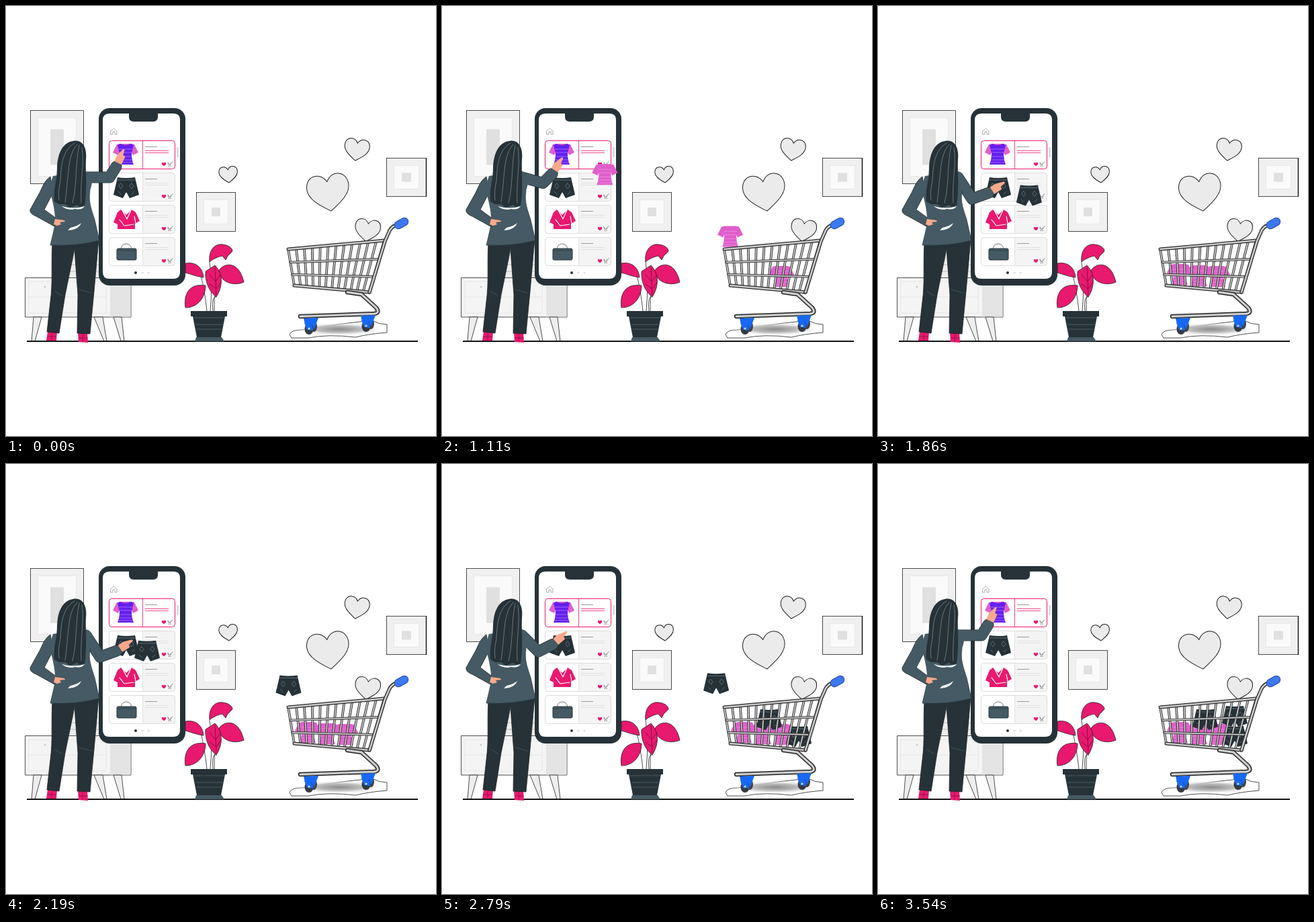
These frames come from a looping animation (640 by 640 pixels, 4.53 s). An HTML page:

```html
<!DOCTYPE html>
<html lang="en">
<head>
<meta charset="utf-8">
<title>Shopping</title>
<style>
html, body { margin: 0; width: 100%; height: 100%; overflow: hidden; background: #fff; }
svg { display: block; width: 640px; height: 640px; }
.navy { fill: #263238; }
.slate { fill: #455a64; }
.pink { fill: #e8196f; }
.skin { fill: #f7a98b; }
.edge { stroke: #222; stroke-width: .8; }
.line { fill: none; stroke-linecap: round; stroke-linejoin: round; }
</style>
</head>
<body>
<svg viewBox="0 0 640 640">
  <defs>
    <radialGradient id="shade">
      <stop offset="0" stop-color="#8c8c8c"/><stop offset=".5" stop-color="#bdbdbd"/><stop offset="1" stop-color="#fff" stop-opacity="0"/>
    </radialGradient>
    <path id="heart" d="M0 28C-11 20-32 8-32-9C-32-30-9-34 0-17C9-34 32-30 32-9C32 8 11 20 0 28Z"/>
    <path id="sleeves" d="M-8-16L-13-15L-19-3L-11 1L-9-3L9-3L11 1L19-3L13-15L8-16Z"/>
    <path id="torso" d="M-8-16Q0-12 8-16L12-14L9-2Q9 8 12 15H-12Q-9 8-9-2L-12-14Z"/>
    <path id="stripes" d="M-10-8H10M-9-3H9M-9 3H9M-10 8H10M-11 12H11" fill="none" stroke-width=".8"/>
    <g id="tee">
      <use href="#sleeves" fill="#e05fca"/><use href="#torso" fill="#e05fca"/><use href="#stripes" stroke="#f08be0"/>
    </g>
    <g id="shorts">
      <path class="navy" d="M-13-15Q0-13 13-15L19 11L5 16L0 7L-5 16L-19 11Z"/>
      <path class="line" stroke="#81909a" stroke-width=".6" d="M-13-11H13M-8-6L-5-2L-8 2L-11-2ZM8-6L11-2L8 2L5-2ZM-12 6L-8 10M12 6L8 10"/>
    </g>
    <g id="icons">
      <use href="#heart" class="pink" transform="translate(235 35.500) scale(.1)"/>
      <path class="line" stroke="#444" stroke-width=".7" d="M241 33L242 36H245L246 33.500M247 32.500L248 32"/>
      <circle cx="242.500" cy="38" r=".6"/><circle cx="245" cy="38" r=".6"/>
    </g>
  </defs>

  <g id="decor"></g>

  <!-- cabinet -->
  <path fill="#ededed" d="M68 374H138V404H68Z"/>
  <path fill="none" stroke="#bbb" d="M70 385H138M70 395H138"/>
  <g class="edge">
    <path fill="#f4f4f4" d="M28.500 404.500H186V463H28.500Z"/>
    <path fill="#e4e4e4" stroke="none" d="M155 405H185.500V462.500H155Z"/>
    <path fill="#eee" d="M41 463H53L43 499H38ZM131 463H144L150 499H146ZM160 463H172L176 499H171Z"/>
  </g>
  <path fill="none" stroke="#e6e6e6" d="M34 410H149V457H34ZM34 433H149"/>
  <circle cx="58" cy="418" r="1.500" fill="#ccc"/>

  <path d="M31 499H613" stroke="#111" stroke-width="2"/>

  <!-- plant -->
  <g class="edge">
    <path class="line" d="M304 454Q308 412 303 381M308 454Q306 430 313 433M299 454Q296 425 290 400M310 454Q309 420 318 395"/>
    <g class="pink">
      <path d="M303 381C301 362 312 353 323 355C331 356 337 360 337 365L330 372L327 378L322 372C316 373 307 377 303 381Z"/>
      <path d="M316 395C322 383 346 376 354 411C340 417 321 413 316 395Z"/>
      <path d="M267 383C283 380 293 390 294 404C284 403 275 399 267 397Z"/>
      <path d="M297 416C297 432 287 449 267 449C264 430 272 412 297 416Z"/>
      <path d="M297 395L311 386C321 396 325 414 313 433C302 425 296 410 297 395Z"/>
      <path class="line" stroke="#7c0b3b" d="M311 389L313 430M303 400L312 410L319 401M303 414L313 421L320 411"/>
    </g>
  </g>
  <path class="navy" d="M275 454H329V462H275ZM278 462H326L320 493H284Z"/>
  <path class="slate" d="M283 493H321L325 499H281Z"/>
  <path d="M279 464H325M282 474H323M283 481H321" stroke="#53666f" stroke-width=".8"/>

  <!-- phone -->
  <rect class="navy" x="138" y="152" width="129" height="264" rx="16"/>
  <path fill="#fff" d="M154 160H183V165Q183 172 190 172H219Q226 172 226 165V160H249Q259 160 259 170V396Q259 406 249 406H154Q144 406 144 396V170Q144 160 154 160Z"/>
  <path class="line" stroke="#999" stroke-width=".8" d="M156 186L160.500 182L165 186V191H162V187H159V191H156Z"/>
  <rect x="254" y="210" width="3" height="15" rx="1" fill="#ddd"/>
  <g id="cards"></g>
  <g transform="translate(178 221)">
    <use href="#sleeves" fill="#e05fca"/><use href="#torso" fill="#651fef"/><use href="#stripes" stroke="#a77af7"/>
  </g>
  <use href="#shorts" x="179" y="270"/>
  <path class="pink" d="M171 303L179 311L187 303L193 307L199 320L192 324V332H166V325L160 322L166 307Z"/>
  <path class="line" stroke="#fff" stroke-width="1.200" d="M173 304L180 317L186 304M169 318L176 327L190 325M191 313L193 323"/>
  <path class="line" stroke="#777" d="M171 362Q172 354 179 354Q186 354 187 362"/>
  <rect class="slate" x="165" y="361" width="29" height="17" rx="2" stroke="#263238"/>
  <path d="M166 364H193" stroke="#263238" stroke-width=".7"/>
  <circle cx="193" cy="397" r="2" class="navy"/>
  <circle cx="203" cy="397" r="1.600" fill="#ddd"/><circle cx="212" cy="397" r="1.600" fill="#ddd"/>

  <g id="items"></g>

  <!-- woman -->
  <path class="pink" d="M62 485H76L75 498H60ZM107 486H121L122 501L108 500Z"/>
  <path d="M61 492H75M108 494H122M68 487V497M114 488V500" stroke="#8c0d43" stroke-width=".8"/>
  <path class="navy edge" d="M69 352C67 385 70 412 66 440L61 485L79 487L88 430L102 362L107 430L106 487L125 488L131 425L138 347Z"/>
  <path class="line" stroke="#53666f" stroke-width=".6" d="M102 362L99 378M73 425L83 431M109 422L127 427"/>
  <g id="arm">
    <polyline class="line" stroke="#263238" stroke-width="17"/>
    <polyline class="line" stroke="#455a64" stroke-width="15.600"/>
    <path class="skin" d="M1-6L10-6L22-2Q25 0 22 1L15 2L14 6L1 6Z"/>
  </g>
  <g class="slate">
    <path class="edge" d="M66 254C57 260 54 270 50 278L36 303C35 308 40 311 45 313L72 328L76 317L57 303L70 278Z"/>
    <path d="M70 253L118 246C130 248 130 261 125 275C122 292 128 305 132 318L139 349Q105 358 66 356L73 326C74 308 70 291 64 272Z"/>
  </g>
  <path class="line" stroke="#263238" stroke-width=".7" d="M125 275C122 292 128 305 132 318L139 349Q105 358 66 356L73 326"/>
  <path class="skin" d="M73 317L87 319L88 321L80 322L82 325L76 327L71 325Z"/>
  <path class="navy" d="M100 201C113 198 121 210 119 228C118 248 121 270 117 297L110 299L106 296L95 300L88 295L79 295L72 291C70 272 76 262 76 240C77 218 85 203 100 201Z"/>
  <path class="line" stroke="#84939a" stroke-width=".7" d="M102 204C84 214 82 238 81 260Q77 278 79 289M106 206C91 222 94 250 88 292M109 207C103 235 106 265 99 293M113 210C117 237 110 260 112 293"/>
  <path fill="#fff" d="M83 298Q101 303 117 298Q113 304 103 302Q92 305 83 298ZM92 334Q108 333 112 323Q106 328 96 330Z"/>

  <!-- cart -->
  <path class="edge" fill="#fff" d="M422 489Q424 482 440 482Q470 477 500 473L545 468Q555 474 567 474V486Q540 488 520 493Q480 488 450 494H425Z"/>
  <ellipse cx="496" cy="481" rx="68" ry="10" fill="url(#shade)"/>
  <g id="cart"></g>
  <g id="wheels"></g>
  <path d="M584 326L593 321" stroke="#1c3c87" stroke-width="12.500" stroke-linecap="round"/>
  <path d="M584 326L593 321" stroke="#3c78f0" stroke-width="11" stroke-linecap="round"/>
</svg>
<script>
const LOOP = 4530, STEP = 30;
const el = id => document.getElementById(id);
const mix = (a, b, p) => a + (b - a) * p;
const clamp = p => Math.min(1, Math.max(0, p));
const add = (id, markup) => el(id).insertAdjacentHTML('beforeend', markup);
const box = (x, y, w, h, fill, extra = '') =>
  `<rect x="${x}" y="${y}" width="${w}" height="${h}" fill="${fill}" ${extra}/>`;

// wall pictures: x, y, width, height, mat inset, centre width, centre height
for (const [x, y, w, h, m, cw, ch] of [
  [36.5, 155.5, 79, 109, 11, 20, 53], [283.5, 277.5, 58, 58, 11, 13, 13], [566.5, 226.5, 59, 57, 11, 14, 13]
]) {
  add('decor', box(x, y, w, h, '#f0f0f0', 'class="edge"') +
    box(x + m, y + m, w - 2 * m, h - 2 * m, '#fafafa', 'stroke="#e8e8e8"') +
    box(x + (w - cw) / 2, y + (h - ch) / 2, cw, ch, '#e0e0e0'));
}
add('decor', '<path d="M625.5 226V284" stroke="#222" stroke-width="1.6"/>');

for (const [x, y, scale, angle] of [[331, 251, .43, -5], [522, 214, .58, 8], [480, 278, .98, -8], [538, 334, .59, 8]]) {
  add('decor', `<use href="#heart" fill="#ebebeb" stroke="#222" stroke-width="${1 / scale}"
    transform="translate(${x} ${y}) rotate(${angle}) scale(${scale})"/>`);
}

for (let i = 0; i < 4; i++) {
  const accent = i ? '#dcdcdc' : '#e8196f';
  add('cards', `<g transform="translate(0 ${200 + 48 * i})">
    ${box(203, .5, 49, 42, i ? '#f4f4f4' : '#fff', 'rx="3"')}
    ${box(153.5, .5, 98, 42, 'none', `rx="4" stroke="${accent}"`)}
    <path d="M203.500 1V42" stroke="${accent}" stroke-width=".8"/>
    <path d="M207 9.500H225" stroke="#999"/>
    <path d="M207 15.500H242M207 18.500H242" stroke="${accent}" stroke-width=".8"/>
    <use href="#icons"/></g>`);
}

// chrome tubes: dark outline, grey body, pale highlight
const tube = (d, width) => [['#222', width], ['#8c8c8c', width * .6], ['#dedede', width * .28]]
  .map(([color, w]) => `<path class="line" d="${d}" stroke="${color}" stroke-width="${w}"/>`).join('');
const onRim = p => [mix(420, 563, p), mix(362, 349, p)];
const onBase = p => [mix(429, 541, p), mix(416, 426, p)];
const rail = p => {
  const [a, b, c, d] = [onRim(0), onBase(0), onRim(1), onBase(1)];
  return `M${mix(a[0], b[0], p)} ${mix(a[1], b[1], p)}L${mix(c[0], d[0], p)} ${mix(c[1], d[1], p)}`;
};
for (let i = 0; i <= 12; i++) add('cart', tube(`M${onRim(i / 12)}L${onBase(i / 12)}`, 3.6));
for (const p of [.36, .7]) add('cart', tube(rail(p), 3.6));
for (const p of [0, 1]) add('cart', tube(rail(p), 5));
add('cart', tube('M541 426L564 350L571 334Q575 327 584 325', 5.4) +
  tube('M508 426L529 429L551 449Q557 457 548 458L438 462', 6.4));

for (const [x, y] of [[452, 479], [537, 475]]) {
  add('wheels', `<ellipse cx="${x + 6}" cy="${y - 2}" rx="5" ry="8" fill="#444"/>
    <path fill="#1769f5" d="M${x - 9} ${y - 14}L${x + 13} ${y - 15}L${x + 7} ${y + 1}L${x - 5} ${y + 3}Z"/>
    <ellipse cx="${x - 1}" cy="${y + 2}" rx="6.5" ry="8" fill="#343a42"/>
    <path fill="#1769f5" d="M${x - 8} ${y - 8}Q${x + 5} ${y - 9} ${x + 5} ${y + 4}L${x - 4} ${y + 3}Z"/>
    <circle cx="${x - 1}" cy="${y + 1}" r="1.6" fill="#ddd"/>`);
}

// garments glide along a straight slope, then drop into their slot
const DROP = 55;
const kinds = {
  tee: { x: 178, y: 221, slope: .47, speed: .45 },
  shorts: { x: 178, y: 270, slope: .245, speed: .593 }
};
const items = [
  ['tee', 137, 505, 403], ['tee', 552, 478, 402], ['tee', 967, 449, 400],
  ['shorts', 1781, 531, 405], ['shorts', 2136, 487, 380], ['shorts', 2402, 531, 375]
].map(([kind, start, endX, endY]) => {
  add('items', `<use href="#${kind}"/>`);
  return { ...kinds[kind], start, endX, endY, node: el('items').lastElementChild };
});

function moveItem(item, t) {
  const { x, y, slope, speed, start, endX, endY, node } = item;
  const px = Math.min(endX, x + speed * (t - start));
  const dropX = endX - DROP;
  const dropY = y + slope * (dropX - x);
  const py = px < dropX ? y + slope * (px - x) : mix(dropY, endY, (px - dropX) / DROP);
  node.style.display = t < start ? 'none' : '';
  node.setAttribute('transform', `translate(${px} ${py})`);
}

const [sleeveEdge, sleeve, hand] = el('arm').children;
function poseArm(p) {
  const elbow = [mix(154, 140, p), mix(255, 287, p)];
  const wrist = [mix(164, 165, p), mix(239, 278, p)];
  const angle = mix(-65, -33, p);
  const points = [[119, 255], elbow, wrist].join(' ');
  sleeveEdge.setAttribute('points', points);
  sleeve.setAttribute('points', points);
  hand.setAttribute('transform', `translate(${wrist}) rotate(${angle}) translate(5 0)`);
}

function draw() {
  const t = Math.floor(performance.now() % LOOP / STEP) * STEP;
  items.forEach(item => moveItem(item, t));
  poseArm(clamp((t - 990) / 450) - clamp((t - 2680) / 450));
  requestAnimationFrame(draw);
}
draw();
</script>
</body>
</html>
```
